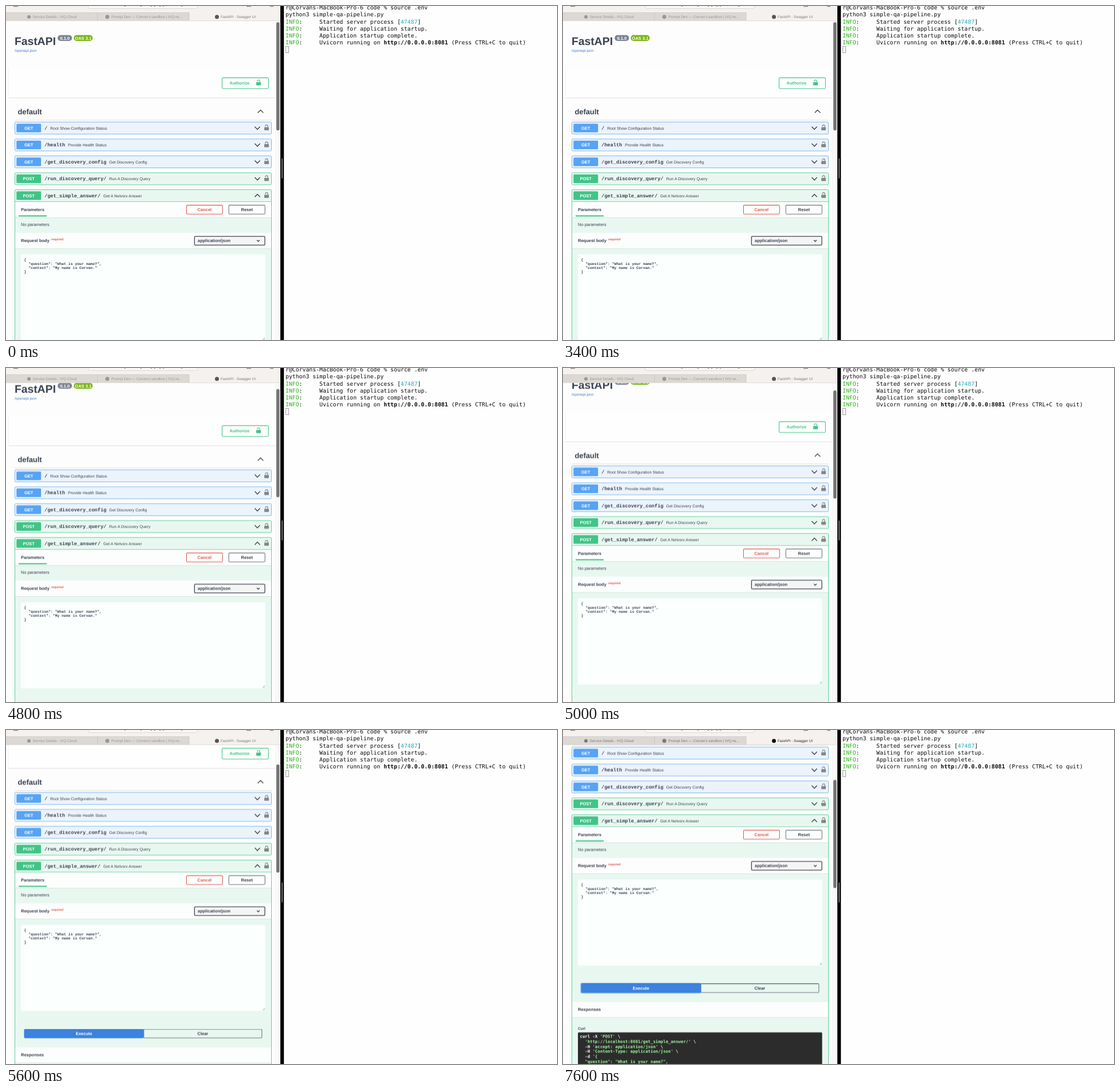
Animation of 960 by 583 pixels, one loop 8000 ms. Source, as an HTML page:

```html
<!DOCTYPE html>
<html lang="en">
<head>
<meta charset="utf-8">
<title>API docs and terminal</title>
<style>
  html, body { margin: 0; width: 100%; height: 100%; overflow: hidden; background: #fefefe; }
  svg { display: block; width: 100vw; height: 100vh; }
  text { white-space: pre; text-rendering: geometricPrecision; font: 7.5px "Liberation Sans", Arial, sans-serif; fill: #3b4151; }
  .b { font-weight: 700; }
  .mid { text-anchor: middle; }
  .white { fill: #fff; }
  .path { font: 700 8.57px "Liberation Mono", monospace; }
  .json { font: 700 6.43px "Liberation Mono", monospace; }
  .curl { font: 700 7.31px "DejaVu Sans Mono", monospace; fill: #fff; }
  .curl tspan { fill: #a2f4a2; }
  .term { font: 9.8px "DejaVu Sans Mono", monospace; fill: #0c0c0c; }
  .tab { font-size: 6.3px; fill: #94908d; }
  .line { fill: none; stroke: #1e1f24; stroke-width: 1.2; }
</style>
</head>
<body>
<svg id="stage" viewBox="0 0 960 583" preserveAspectRatio="none"></svg>
<script>
const LOOP = 8000;
const FOCUS_AT = 7000;
// [time in ms, scrolled distance in px]
const SCROLL = [[0, 0], [4600, 5.3], [4800, 24.8], [5000, 31.7], [5400, 55], [5600, 93.5], [5800, 172.7]];
const THUMB_RATIO = 0.34;

const BLUE = '#57a3f5', GREEN = '#41c487', MINT = '#e9f7f1', RED = '#e2574f', GRAY = '#70747c';

const rect = (x, y, w, h, fill, extra = '') =>
  `<rect x="${x}" y="${y}" width="${w}" height="${h}" fill="${fill}" ${extra}/>`;
const text = (x, y, str, cls = '', extra = '') =>
  `<text x="${x}" y="${y}" class="${cls}" ${extra}>${str}</text>`;
const lines = (x, y, step, cls, rows) =>
  rows.map((row, i) => text(x, y + i * step, row, cls)).join('');
const dot = (x, y, r, fill) => `<circle cx="${x}" cy="${y}" r="${r}" fill="${fill}"/>`;
const stroke = (color, width = 1.07, radius = 1.6) =>
  `stroke="${color}" stroke-width="${width}" rx="${radius}"`;

const chevron = (x, y, dir = 1, size = 4.6) =>
  `<path class="line" d="M${x - size} ${y - dir * size / 2}l${size} ${dir * size}l${size} ${-dir * size}"/>`;

const lock = (x, y, color) =>
  rect(x - 4, y - 0.6, 8, 5.4, color, 'rx="0.9"') +
  `<path d="M${x - 2.2} ${y - 1.8}v-.6a2.2 2.2 0 0 1 4.4 0v2.4" fill="none" stroke="${color}" stroke-width="1.1"/>`;

const button = (x, y, w, h, label, color, fill = 'none', textColor = color) =>
  rect(x, y, w, h, fill, stroke(color)) +
  text(x + w / 2, y + h / 2 + 2.7, label, 'b mid', `style="fill:${textColor}"`);

function operation(y, verb, path, summary, open) {
  const get = verb === 'GET';
  const color = get ? BLUE : GREEN;
  const summaryX = 67 + path.length * 5.14 + 4.9;
  return rect(15.5, y - 10.4, 447, open ? 640 : 20.9, get ? '#ebf3fb' : MINT, stroke(get ? '#83b9ef' : '#62cf9d', 1)) +
    rect(18.2, y - 7.6, 42.9, 15.2, color, 'rx="1.6"') +
    text(39.6, y + 2.7, verb, 'b mid white') +
    text(67, y + 2.6, path, 'path') +
    text(summaryX, y + 2.5, summary, '', 'style="font-size:6.96px"') +
    chevron(438, y, open ? -1 : 1) +
    lock(454, y - 0.8, '#858585');
}

const sectionHead = (y, h) =>
  rect(16, y, 446, h, '#fcfefd') + rect(16, y + h, 446, 0.8, '#d5e3dc');

const pageHeader =
  text(15, 68, 'FastAPI', 'b', 'style="font-size:19.28px"') +
  rect(90, 50.8, 25, 10.2, '#7d8492', 'rx="5.1"') + text(102.5, 58.6, '0.1.0', 'b mid white') +
  rect(118, 50.8, 33, 10.2, '#7cb518', 'rx="5.1"') + text(134.5, 58.6, 'OAS 3.1', 'b mid white') +
  text(15, 80, '/openapi.json', '', 'style="font-size:6.43px;fill:#3c80cf"') +
  rect(4.5, 108, 465, 52, '#fefefe') + rect(4.5, 160, 465, 1, '#dfdfdf') + rect(4, 110, 0.7, 50, '#eeeeee') +
  rect(376.5, 125.4, 80.8, 18.8, 'none', stroke(GREEN)) +
  text(389.5, 137.4, 'Authorize', 'b', `style="fill:${GREEN}"`) + lock(440, 133.6, GREEN) +
  text(20.4, 189.3, 'default', 'b', 'style="font-size:12.85px"') +
  chevron(443.5, 184, -1, 4.8) + rect(15, 198.8, 448, 0.8, '#d6d8dc');

const operations =
  operation(213, 'GET', '/', 'Root Show Configuration Status') +
  operation(242.5, 'GET', '/health', 'Provide Health Status') +
  operation(272, 'GET', '/get_discovery_config', 'Get Discovery Config') +
  operation(301.5, 'POST', '/run_discovery_query/', 'Run A Discovery Query') +
  operation(331, 'POST', '/get_simple_answer/', 'Get A Nelvorx Answer', true);

const requestForm =
  rect(16, 341.2, 446, 0.9, '#62cf9d') +
  sectionHead(342, 27) + text(26, 358.1, 'Parameters', 'b') + rect(22, 365.4, 49, 2.1, GREEN) +
  button(314.5, 347.6, 62.8, 15.6, 'Cancel', RED) +
  button(388.2, 347.6, 63, 15.6, 'Reset', GRAY, 'none', '#3b4151') +
  text(26, 383.8, 'No parameters') +
  sectionHead(396, 27) + text(26, 412.3, 'Request body', 'b') +
  text(78.6, 409, 'required', 'b', `style="font-size:5.36px;fill:${RED}"`) +
  rect(328.4, 402.2, 122.6, 15.2, '#f4f6f5', stroke('#41444e', 1.3)) +
  text(334, 412.3, 'application/json', 'b') + chevron(439.5, 409.8, 1, 2.4) +
  rect(26, 433.8, 425.5, 150.2, '#fbfffd', 'rx="1.6"') +
  lines(31.5, 444.7, 7.05, 'json', ['{', '  "question": "What is your name?",', '  "context": "My name is Corvan."', '}']) +
  '<path d="M447.2 582.6l3.6-3.6m-1.6 3.6l1.6-1.6" stroke="#777" stroke-width=".7"/>' +
  `<g class="focused">${rect(31, 614.8, 209.4, 17, 'none', stroke('#8db9ee', 1.4, 2))}</g>` +
  button(240, 615.6, 205.8, 15.4, 'Clear', GRAY, 'none', '#3b4151') +
  button(32, 615.6, 207.6, 15.4, 'Execute', '#3c82de', '#3c82de', '#fff');

const responses =
  sectionHead(647.6, 26.6) + text(26, 663.4, 'Responses', 'b') +
  text(26, 696, 'Curl', 'b', 'style="font-size:6.43px"') +
  rect(26, 700.6, 425.5, 120, '#2c2c2c', 'rx="1.6"') +
  lines(29.5, 710.2, 8.67, 'curl', [
    "curl -X <tspan>'POST'</tspan> \\",
    "  <tspan>'http://localhost:8081/get_simple_answer/'</tspan> \\",
    "  -H <tspan>'accept: application/json'</tspan> \\",
    "  -H <tspan>'Content-Type: application/json'</tspan> \\",
    "  -d <tspan>'{</tspan>",
    '<tspan>  "question": "What is your name?",</tspan>',
  ]);

const tabLabels = (style, activeStyle, active) =>
  dot(40, 19, 3, style) + text(46.5, 21.2, 'Service Details - IVQ Cloud', 'tab', `style="fill:${style}"`) +
  dot(176.5, 19, 3.4, style) + text(183.5, 21.2, "Prompt Den — Corvan's sandbox | IVQ ne...", 'tab', `style="fill:${style}"`) +
  dot(367.5, 19, 3.5, active) + text(374, 21.2, 'FastAPI - Swagger UI', 'tab', `style="fill:${activeStyle}"`);

const browserBar =
  rect(0, 0, 478, 26, '#f4f1ee') +
  rect(0, 11.4, 319, 14.2, '#dcd8d4') +
  rect(159, 11.4, 0.8, 14.2, '#c6c2be') + rect(318.6, 11.4, 0.8, 14.2, '#c6c2be') +
  rect(0, 11, 319, 0.7, '#cfcbc7') + rect(0, 25.5, 478, 0.7, '#d5d1cd') +
  rect(143, -8, 191, 12.4, '#faf8f6', stroke('#d9d5d1', 0.9, 3.5)) +
  [[13, 8], [419, 8], [460, 6]].map(([x, w]) => rect(x, 0, w, 1.3, '#8c8885')).join('') +
  [206, 234, 252, 258, 267, 273, 305].map(x => rect(x, 0, 2.4, 1, '#8a8683')).join('') +
  `<g class="blurred">${tabLabels('#9a9693', '#7e7a78', '#555')}</g>` +
  `<g class="focused">${rect(330, 14, 120, 10, '#f4f1ee')}${tabLabels('#7c7876', '#2c2a29', '#111')}</g>`;

const info = message => `<tspan fill="#2fb41d">INFO</tspan>:     ${message}`;
const terminal =
  rect(484, 0, 476, 583, '#fefefe') +
  lines(487, 6.2, 12.25, 'term', [
    'r@Corvans-MacBook-Pro-6 code % source .env',
    'python3 simple-qa-pipeline.py',
    info('Started server process [<tspan fill="#2eaabb">47487</tspan>]'),
    info('Waiting for application startup.'),
    info('Application startup complete.'),
    info('Uvicorn running on <tspan font-weight="700">http://0.0.0.0:8081</tspan> (Press CTRL+C to quit)'),
  ]) +
  rect(487.5, 70.5, 5, 11, 'none', 'stroke="#a2a2a2" stroke-width="1"');

document.getElementById('stage').innerHTML =
  rect(0, 0, 478, 583, '#fcfdfc') +
  `<g id="page">${pageHeader}${operations}${requestForm}${responses}</g>` +
  rect(470, 26, 8, 557, '#fafafa') + rect(469.6, 26, 0.6, 557, '#ececec') +
  rect(471, 28.3, 5.6, 189, '#757575', 'rx="2.8" id="thumb"') +
  browserBar + terminal +
  rect(478, 0, 6.2, 583, '#000') + rect(480, 266, 2, 35, '#777', 'rx="1"');

function playSteps(element, steps, property, format) {
  const held = [...steps, [LOOP, steps[steps.length - 1][1]]];
  element.animate(
    held.map(([time, value]) => ({ offset: time / LOOP, [property]: format(value), easing: 'step-end' })),
    { duration: LOOP, iterations: Infinity });
}

const moveY = factor => distance => `translateY(${distance * factor}px)`;
playSteps(document.getElementById('page'), SCROLL, 'transform', moveY(-1));
playSteps(document.getElementById('thumb'), SCROLL, 'transform', moveY(THUMB_RATIO));
for (const el of document.querySelectorAll('.focused')) playSteps(el, [[0, 0], [FOCUS_AT, 1]], 'opacity', String);
for (const el of document.querySelectorAll('.blurred')) playSteps(el, [[0, 1], [FOCUS_AT, 0]], 'opacity', String);
</script>
</body>
</html>
```
